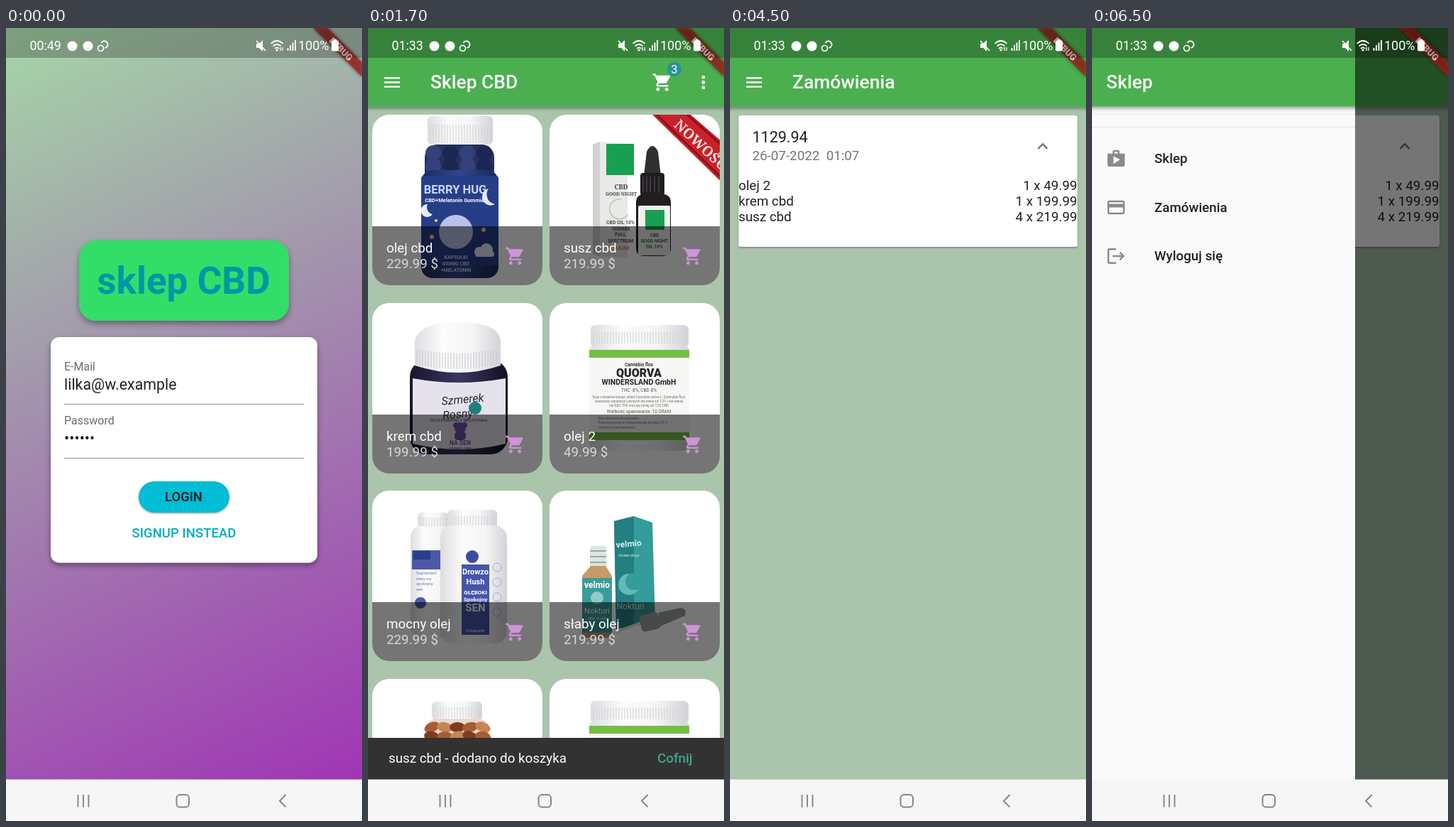
Recreate the animation shown at these times as an HTML page. Size 502 px wide and 1116 px high, loop 8000 ms.

```html
<!DOCTYPE html>
<html lang="pl">
<head>
<meta charset="utf-8">
<title>Sklep</title>
<style>
html, body { margin: 0; width: 100%; height: 100%; overflow: hidden; background: #f6f6f6; }
svg { display: block; width: 502px; height: 1116px; font-family: Roboto, "Noto Sans", sans-serif; }
</style>
</head>
<body>
<svg id="stage" viewBox="0 0 502 1116" xmlns="http://www.w3.org/2000/svg"></svg>
<script>
const GREEN = '#4caf50', PAGE = '#aac5ac', DARK = '#212121';
const MID = ' text-anchor="middle"', END = ' text-anchor="end"';
const MEDIUM = ' font-weight="500"', BOLD = ' font-weight="700"', BLACK = ' font-weight="900"';
const SERIF = ' font-family="Noto Serif, serif"';
const BODY = 18.8, TITLE = 26.4;

const ICONS = {
  cart: 'M7 18c-1.1 0-2 .9-2 2s.9 2 2 2 2-.9 2-2-.9-2-2-2zM1 2v2h2l3.6 7.6-1.35 2.44c-.16.28-.25.61-.25.96 0 1.1.9 2 2 2h12v-2H7.42c-.14 0-.25-.11-.25-.25l.03-.12.9-1.63h7.45c.75 0 1.41-.41 1.75-1.03l3.58-6.49A1 1 0 0 0 20 4H5.21l-.94-2H1zm16 16c-1.1 0-2 .9-2 2s.9 2 2 2 2-.9 2-2-.9-2-2-2z',
  menu: 'M3 18h18v-2H3zM3 13h18v-2H3zM3 6v2h18V6z',
  back: 'M20 11H7.83l5.59-5.59L12 4l-8 8 8 8 1.41-1.41L7.83 13H20z',
  up: 'M4 12l1.41 1.41L11 7.83V20h2V7.83l5.58 5.59L20 12l-8-8z',
  down: 'M20 12l-1.41-1.41L13 16.17V4h-2v12.17l-5.58-5.59L4 12l8 8z',
  more: 'M12 4a2 2 0 1 0 .01 0zM12 10a2 2 0 1 0 .01 0zM12 16a2 2 0 1 0 .01 0z',
  less: 'M12 8l-6 6 1.41 1.41L12 10.83l4.59 4.58L18 14z',
  shop: 'M16 6V4c0-1.11-.89-2-2-2h-4c-1.11 0-2 .89-2 2v2H2v13c0 1.11.89 2 2 2h16c1.11 0 2-.89 2-2V6zM10 4h4v2h-4zM9 18V9l7.5 4z',
  card: 'M20 4H4a2 2 0 0 0-2 2v12a2 2 0 0 0 2 2h16a2 2 0 0 0 2-2V6a2 2 0 0 0-2-2zm0 14H4v-6h16zm0-10H4V6h16z',
  exit: 'M17 7l-1.41 1.41L18.17 11H8v2h10.17l-2.58 2.58L17 17l5-5zM4 5h8V3H4a2 2 0 0 0-2 2v14a2 2 0 0 0 2 2h8v-2H4z'
};

const text = (x, y, size, str, fill = '#fff', more = '') =>
  `<text x="${x}" y="${y}" font-size="${size}" fill="${fill}" xml:space="preserve"${more}>${str}</text>`;
const rect = (x, y, w, h, fill, rx = 0, more = '') =>
  `<rect x="${x}" y="${y}" width="${w}" height="${h}" fill="${fill}" rx="${rx}" ${more}/>`;
const circle = (x, y, r, fill, more = '') => `<circle cx="${x}" cy="${y}" r="${r}" fill="${fill}" ${more}/>`;
const path = (d, fill, more = '') => `<path d="${d}" fill="${fill}" ${more}/>`;
const line = (d, stroke, width) => path(d, 'none', `stroke="${stroke}" stroke-width="${width}"`);
const group = (x, y, scale, body, more = '') =>
  `<g transform="translate(${x} ${y}) scale(${scale})" ${more}>${body}</g>`;
const turned = (x, y, angle, body) => `<g transform="translate(${x} ${y}) rotate(${angle})">${body}</g>`;
// Icons sit on a 24-unit grid, centred on the given point.
const icon = (name, cx, cy, fill) => group(cx - 14.66, cy - 14.66, 1.222, path(ICONS[name], fill, 'fill-rule="evenodd"'));
const appBar = (title, x = 88) =>
  rect(-8, 0, 518, 110.5, GREEN, 0, 'filter="url(#barShadow)"') + text(x, 85, TITLE, title, '#fff', MEDIUM);
const page = rect(0, 0, 502, 1058, PAGE);

const lid = (x, y, w, h) => {
  let ridges = '';
  for (let i = x + 4; i < x + w - 2; i += 4) ridges += `M${i} ${y + h * .3}V${y + h - 3}`;
  return rect(x, y, w, h, 'url(#white)', 6) + line(ridges, '#cfd0d4', 1);
};
const rows = (x, y, size, lines, fill, more = MID) =>
  lines.map((str, i) => text(x, y + i * size * 1.25, size, str, fill, more)).join('');
const times = (count, draw) => Array.from({ length: count }, (_, i) => draw(i)).join('');

const products = {
  gummies:
    rect(74, 42, 98, 60, '#26315f', 18) +
    times(8, i => circle(86 + i % 4 * 24, 54 + (i >> 2) * 18, 11, i % 2 ? '#1b2752' : '#33427c')) +
    lid(78, 2, 92, 40) +
    rect(69, 78, 109, 152, 'url(#navy)', 16) + rect(69, 86, 109, 126, '#263e88', 4) +
    text(117, 111, 16.5, 'BERRY HUG', '#cbd7ff', MID + BOLD) +
    text(118, 123, 7.6, 'CBD+Melatonin Gummies', '#fff', MID + BOLD) +
    circle(118, 165, 24, '#b9c1e6') +
    path('M164 104a12 12 0 1 0 9 22a14 14 0 0 1-9-22z', '#e7ebff') +
    path('M78 126a9 9 0 1 0 7 14a10 10 0 0 1-7-14z', '#e7ebff') +
    circle(157, 162, 3, '#f2d577') + circle(84, 172, 3, '#f2d577') + circle(90, 149, 2, '#f2d577') +
    circle(151, 193, 7, '#e4e9fa') + circle(161, 190, 9, '#e4e9fa') + rect(145, 192, 27, 8, '#e4e9fa', 4) +
    rows(118, 203, 7, ['KAPSUŁKI', '450MG CBD', '+MELATONIN'], '#cbd7ff', MID + BOLD),

  drops:
    path('M61 42l10-4 39 3v160l-38-1-11-4z', '#e9e9e7') + path('M61 42l10-4v162l-10-4z', '#cfd2ce') +
    rect(80, 41, 39, 44, '#18a052') +
    text(101, 105, 9, 'CBD', '#3c4440', MID + BOLD + SERIF) +
    text(101, 114, 6.5, 'GOOD NIGHT', '#3c4440', MID + BOLD + SERIF) +
    line('M101 119a14 14 0 1 0 9 22', '#a9cdb9', 1.5) +
    rows(100, 154, 6.8, ['CBD OIL 10%', '1000MG', 'FULL', 'SPECTRUM'], '#4b504d', MID + BOLD) +
    text(101, 190, 6.5, 'OLEJEK', '#d97842', MID + BOLD) +
    path('M137 52q8-16 16 0l4 34h-24z', '#302e30') + rect(128, 82, 34, 32, '#1f1d20', 4) +
    line('M132 87v22M137 87v22M142 87v22M148 87v22M154 87v22', '#47434a', 1.5) +
    rect(122, 112, 49, 87, '#211d1d', 10) + rect(125, 128, 45, 70, '#f0f2ee', 2) +
    rect(135, 134, 27, 28, '#18a052') +
    rows(148, 172, 6.5, ['CBD', 'GOOD NIGHT', 'OIL 10%'], '#3b6b50', MID + BOLD) +
    path('M145 0h54l63 54v60z', '#c9212b') + line('M151 0l111 108M194 0l68 60', '#8d1119', 3) +
    turned(211, 50, 43, text(0, 0, 20, 'NOWOŚĆ!', '#ffe5dc', MID + BOLD + SERIF)),

  cream:
    rect(53, 80, 138, 133, 'url(#ink)', 24) + path('M57 106q65 12 131 0v92q-65 16-131 0z', '#e5e2ec') +
    path('M60 54q5-27 62-27t59 27v34q-59 20-121 0z', 'url(#white)') +
    line(times(29, i => `M${63 + i * 4} ${65 + 6 * Math.sin(i / 28 * Math.PI)}v22`), '#cdccd2', 1.2) +
    turned(118, 142, -5, rows(-20, 0, 16, ['Szmerek', 'Rosny'], '#28243a', ' font-style="italic"')) +
    circle(145, 148, 9, '#1c7f7b') +
    text(122, 167, 5.5, 'ŻELKI KONOPNE Z MELATONINĄ', '#443b66', MID) +
    circle(118, 172, 4, '#724caa') + circle(130, 172, 4, '#724caa') + circle(124, 176, 8, '#724caa') +
    rect(116, 181, 16, 12, '#724caa', 5) +
    text(124, 200, 8.5, 'NA SEN', '#724caa', MID + BOLD) + text(124, 206.5, 6, '750MG CBD', '#443b66', MID),

  tub:
    lid(58, 31, 138, 31) + rect(56, 57, 141, 151, 'url(#white)', 12) +
    rect(56, 66, 141, 11, '#74bd42') + rect(56, 77, 141, 105, '#f7f7f5') + rect(56, 182, 141, 11, '#74bd42') +
    text(126, 89, 6.5, 'Cannabis flos', '#333', MID + BOLD) +
    text(126, 104, 16, 'QUORVA', '#222', MID + BLACK) +
    text(126, 115, 10.5, 'WINDERSLAND GmbH', '#222', MID + BOLD) +
    text(126, 125, 6.5, 'THC  8%, CBD 8%', '#555', MID) +
    rows(126, 134, 4.6, ['Susz z kwiatów konopi, skład: Cannabis sativa L. (Cannabis flos)', 'zawartość substancji czynnych nie mniej niż 7,2% i nie więcej', 'niż 8,8% THC oraz nie mniej niż 7,2% CBD'], '#666') +
    text(126, 155, 6.3, 'Wielkość opakowania: 10 GRAM', '#555', MID) +
    rows(68, 164, 5, ['Warunki przechowywania:', 'Przechowywać w temperaturze poniżej 25°C', 'Chronić przed światłem'], '#777', ''),

  capsules:
    lid(64, 31, 44, 22) + rect(54, 50, 60, 157, 'url(#white)', 15) + rect(56, 84, 42, 27, '#4b59a9') +
    rect(58, 85, 24, 12, '#283d8c') + rows(62, 118, 6, ['Suplement', 'diety na', 'spokojny', 'sen'], '#6973b3', '') +
    circle(68, 158, 8, '#4b59a9') +
    lid(106, 27, 70, 27) + rect(96, 49, 94, 166, 'url(#white)', 18) +
    rect(126, 104, 39, 99, '#4655aa') + circle(141, 93, 9, '#3f4c9d') +
    rows(145.5, 118, 11, ['Drowzo', 'Hush'], '#fff', MID + BOLD) +
    rows(145.5, 146, 8, ['GŁĘBOKI', 'Spokojny'], '#fff', MID + BOLD) +
    text(145.5, 170, 15, 'SEN', '#fff', MID + BOLD) + text(145.5, 199, 5, '60 kapsułek', '#fff', MID) +
    times(4, i => circle(176, 108 + i * 21, 6, 'none', 'stroke="#a3a9cd"')),

  oil:
    path('M91 43l28-7 26 9 4 140-55 10z', '#349c9a') + path('M91 43l28-7v153l-25 6z', '#237f81') +
    turned(112, 79, -5, text(0, 0, 12, 'velmio', '#d8f0ed', MID + BOLD)) +
    text(112, 93, 5, 'Golden drops', '#d8f0ed', MID) +
    circle(112, 132, 15, '#62b9b5') + circle(119, 128, 12, '#349c9a') + text(114, 167, 12, 'Nokturi', '#d8f0ed', MID) +
    rect(57, 78, 23, 34, '#dce5df', 4) + line('M57 85h23M57 93h23M57 101h23', '#9daaa4', 2) +
    path('M58 106h21l9 14v80q0 7-7 7H53q-7 0-7-7v-80z', '#c79b68') + rect(46, 123, 42, 77, '#3c9b99') +
    text(67, 137, 12, 'velmio', '#fff', MID + BOLD) + circle(67, 151, 9, '#8ccdc7') +
    text(67, 173, 11, 'Nokturi', '#fff', MID) + text(67, 182, 5.5, 'CBD FLUID', '#fff', MID) +
    line('M94 199l43-16', '#e3e6e5', 4) + rect(128, 173, 27, 24, '#9a9fa0', 5, 'transform="rotate(-14 141 185)"') +
    path('M153 172l32-7q9 1 6 11l-35 15z', '#9a9fa0'),

  amber:
    lid(84, 32, 71, 26) + rect(76, 56, 88, 110, '#ead8cb', 15) +
    times(10, i => turned(84 + i % 5 * 18, 68 + (i > 4) * 13, i * 37 % 50 - 25,
      `<ellipse rx="11" ry="7" fill="${['#a85c32', '#c98454', '#7d3b21'][i % 3]}"/>`))
};

const tile = (x, y, product, name = '', price = '') => group(x, y, 1,
  rect(0, 0, 240, 240, '#fff') + products[product] + rect(0, 157, 240, 83, 'rgba(0,0,0,.54)') +
  text(20, 194, BODY, name) + text(20, 216, BODY, price, '#d8d8d8') +
  icon('cart', 201.5, 199, '#ce93d8'), 'clip-path="url(#tileClip)"');

const cartRow = (y, name, count, product, px, py, scale) =>
  rect(5, y, 492, 171.5, '#fff', 4, 'filter="url(#softShadow)"') +
  group(px, py, scale, products[product]) +
  text(381.5, y + 46, 25.3, name, DARK, MID) +
  icon('up', 316.5, y + 100.5, DARK) + icon('down', 375, y + 100.5, DARK) +
  text(439.5, y + 115, 41, count, DARK, MID);

const login =
  rect(0, 0, 502, 1058, 'url(#sky)') +
  rect(103, 299, 296, 113, '#31de67', 24, 'filter="url(#deepShadow)"') +
  text(250.5, 374, 53, 'sklep CBD', '#0097a7', MID + BOLD) +
  rect(63, 435, 376, 317.5, '#fff', 12, 'filter="url(#deepShadow)"') +
  text(82, 481.5, 16, 'E-Mail', '#6b6b6b') + text(82, 509, 21.4, 'lilka@w.example', DARK) +
  line('M82 529.5H420M82 605.5H420', '#8f8f8f', 1.2) +
  text(82, 557.5, 16, 'Password', '#6b6b6b') + text(82, 585, 21.4, '••••••', DARK) +
  rect(187, 638, 128, 44, '#00bcd4', 22, 'filter="url(#softShadow)"') +
  text(250.5, 666, 18.4, 'LOGIN', '#10191b', MID + MEDIUM) +
  text(251, 717, 18.6, 'SIGNUP INSTEAD', '#00acc1', MID + MEDIUM);

const shop = page +
  tile(6, 122, 'gummies', 'olej cbd', '229.99 $') + tile(256, 122, 'drops', 'susz cbd', '219.99 $') +
  tile(6, 387, 'cream', 'krem cbd', '199.99 $') + tile(256, 387, 'tub', 'olej 2', '49.99 $') +
  tile(6, 651, 'capsules', 'mocny olej', '229.99 $') + tile(256, 651, 'oil', 'słaby olej', '219.99 $') +
  tile(6, 916, 'amber') + tile(256, 916, 'tub') +
  appBar('Sklep CBD') + icon('menu', 34, 76.5, '#fff') + icon('cart', 415, 76.5, '#fff') + icon('more', 473, 76.5, '#fff') +
  circle(432, 58, 10, '#2b8f99') + text(432, 64, 16.5, '3', '#fff', MID) +
  rect(0, 999, 502, 59, '#323232') +
  text(29, 1034, BODY, 'susz cbd - dodano do koszyka') + text(408, 1034, BODY, 'Cofnij', '#3fa58c', MEDIUM);

const basket = page + appBar('Koszyk') + icon('back', 34, 76.5, '#fff') +
  cartRow(115, 'olej 2', 1, 'tub', 70.5, 136.5, .56) +
  cartRow(296, 'krem cbd', 1, 'cream', 55.5, 302, .667) +
  cartRow(476.5, 'susz cbd', 4, 'drops', 56.7, 484, .662) +
  rect(5, 975, 492, 78, '#673ab7', 0, 'filter="url(#deepShadow)"') +
  text(14.5, 1026, 33.5, 'Suma: 1129.94 zł') + text(394, 1022, TITLE, 'ZAMOW', '#fff', MID + MEDIUM);

const orderLines = [['olej 2', '1 x 49.99'], ['krem cbd', '1 x 199.99'], ['susz cbd', '4 x 219.99']];
const orders = page + appBar('Zamówienia') + icon('menu', 34, 76.5, '#fff') +
  rect(12, 123, 478, 185, '#fff', 4, 'filter="url(#softShadow)"') +
  text(31.5, 161, 21.5, '1129.94', DARK) + text(31.5, 186, BODY, '26-07-2022  01:07', '#757575') +
  icon('less', 441, 166.5, '#757575') +
  orderLines.map(([name, sum], i) =>
    text(12, 228 + i * 22, BODY, name, DARK) + text(489.5, 228 + i * 22, BODY, sum, DARK, END)).join('');

const drawerItems = [['shop', 'Sklep'], ['card', 'Zamówienia'], ['exit', 'Wyloguj się']];
const drawer = rect(0, 0, 502, 1058, 'rgba(0,0,0,.54)') +
  rect(0, 0, 371, 1058, '#fafafa') +
  `<g clip-path="url(#drawerClip)">${appBar('Sklep', 20)}</g>` +
  line('M0 121H371M0 139.5H371', '#e6e6e6', 1) +
  drawerItems.map(([name, label], i) =>
    icon(name, 34, 184 + i * 68.5, '#8a8a8a') + text(88, 190 + i * 68.5, BODY, label, DARK, MEDIUM)).join('');

const band = 'M433 0h21l48 48v21z';
const ribbon = path(band, '#000', 'opacity=".5" filter="url(#blur)"') + path(band, '#b71c1c', 'opacity=".66"') +
  turned(472.5, 29.5, 45, text(0, 4.5, 12.6, 'DEBUG', '#fff', MID + BLACK + ' opacity=".8"'));

const statusBar = rect(0, 0, 502, 42, 'rgba(0,0,0,.25)') +
  text(33.5, 31, 17.8, '', '#fff', ' id="clock"') +
  circle(93.5, 25.5, 7, '#fff') + circle(115.5, 25.5, 7, '#fff') +
  circle(133.5, 28.5, 4, 'none', 'stroke="#fff" stroke-width="1.7"') +
  line('M134.5 21a4.8 4.8 0 1 1 5 7', '#fff', 1.7) +
  path('M353 22h4l5-5v16l-5-5h-4z', '#fff') + line('M353 18l13 14', '#fff', 1.6) +
  line('M373.5 22q8.5-8 17 0M376.5 25.5q5.5-5 11 0M379 29q3-3 6 0', '#fff', 1.7) +
  circle(382, 31, 1.6, '#fff') + line('M387 32v-5M390 27v5', '#fff', 1.3) +
  line('M397.5 32v-4M401 32v-8M404.5 32v-11.5M408 32v-15', '#fff', 1.9) +
  text(412, 31, 18, '100%') + rect(459, 17.5, 10, 15, '#fff', 2) + rect(461.5, 16, 5, 3, '#fff', 1);

const navBar = rect(0, 1057.5, 502, 58.5, '#f6f6f6') +
  line('M101.5 1079v17.5M109 1079v17.5M116.5 1079v17.5', '#858585', 1.9) +
  rect(240.5, 1079, 17.5, 17.5, 'none', 5, 'stroke="#858585" stroke-width="2"') +
  line('M394.5 1079l-8.5 8.7 8.5 8.7', '#858585', 2);

const gradient = (id, stops, coords = '') => `<linearGradient id="${id}" ${coords}>` +
  stops.map((color, i) => `<stop offset="${i / (stops.length - 1)}" stop-color="${color}"/>`).join('') + '</linearGradient>';
const shadow = (id, dy, blur, alpha) =>
  `<filter id="${id}" x="-10%" y="-25%" width="120%" height="150%"><feDropShadow dx="0" dy="${dy}" stdDeviation="${blur}" flood-opacity="${alpha}"/></filter>`;
const clip = (id, w, h, rx = 0) => `<clipPath id="${id}">${rect(0, 0, w, h, '#000', rx)}</clipPath>`;

const screens = { login, shop, basket, orders, drawer };
const stage = document.getElementById('stage');
stage.innerHTML = '<defs>' +
  gradient('sky', ['#a5d6a7', '#a035b5'], 'gradientUnits="userSpaceOnUse" x1="0" y1="0" x2="502" y2="1058"') +
  gradient('white', ['#dcdde0', '#fcfcfc', '#f5f5f6', '#d2d3d7']) +
  gradient('navy', ['#1b2a5e', '#2f4690', '#1a2756']) + gradient('ink', ['#17152c', '#3a3764', '#121020']) +
  shadow('barShadow', 3, 2.5, .35) + shadow('softShadow', 1.3, 1.2, .35) + shadow('deepShadow', 4, 4.5, .38) +
  '<filter id="blur"><feGaussianBlur stdDeviation="2.5"/></filter>' +
  clip('tileClip', 240, 240, 24) + clip('drawerClip', 371, 1058) + '</defs>' +
  Object.entries(screens).map(([name, body]) => `<g id="screen-${name}">${body}</g>`).join('') +
  ribbon + statusBar + navBar;

const LOOP = 8000;
const timeline = [
  { from: 0, show: ['login'], time: '00:49' },
  { from: 500, show: ['shop'], time: '01:33' },
  { from: 2500, show: ['basket'], time: '01:33' },
  { from: 4500, show: ['orders'], time: '01:33' },
  { from: 6500, show: ['orders', 'drawer'], time: '01:33' }
];
const layers = Object.keys(screens).map(name => [name, document.getElementById('screen-' + name)]);
const clock = document.getElementById('clock');
const start = performance.now();

function render(now) {
  const elapsed = Math.max(0, now - start) % LOOP;
  const scene = timeline.findLast(s => s.from <= elapsed);
  for (const [name, layer] of layers) layer.style.display = scene.show.includes(name) ? '' : 'none';
  clock.textContent = scene.time;
  requestAnimationFrame(render);
}
render(start);
</script>
</body>
</html>
```
